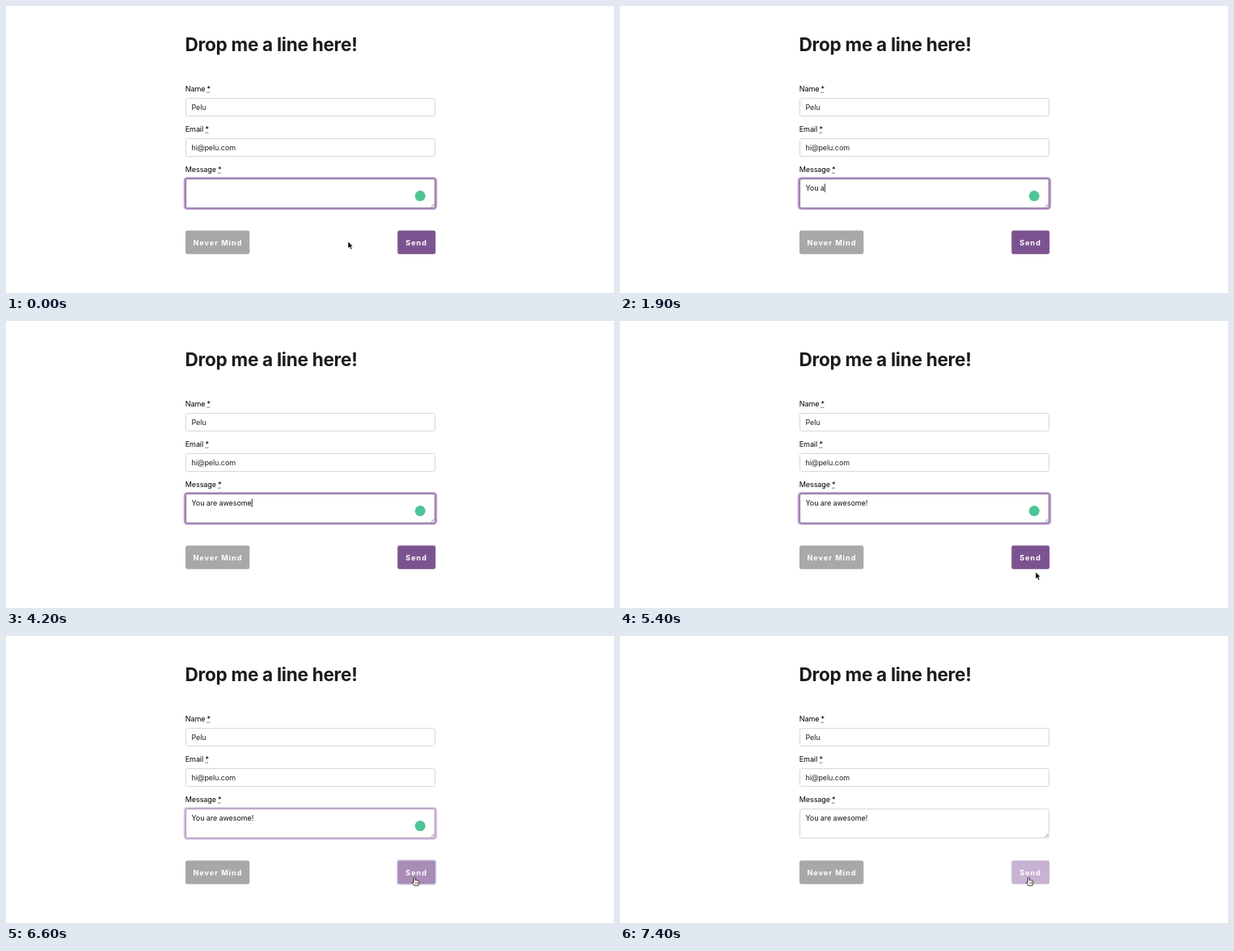
These frames come from a looping animation (752x356 px, 8000 ms). An HTML page:

```html
<!DOCTYPE html>
<html lang="en">
<head>
<meta charset="utf-8">
<title>Contact form</title>
<style>
  html, body { margin: 0; width: 100%; height: 100%; overflow: hidden; background: #fff; }
  svg { display: block; width: 752px; height: 356px; }
  text {
    font: 9px Inter, "Open Sans", sans-serif;
    font-optical-sizing: none;
    letter-spacing: -.09px;
    white-space: pre;
    fill: #222;
  }
  .title { font-size: 22.6px; font-weight: 700; letter-spacing: -.29px; fill: #1b1b1b; }
  .label { fill: #000; }
  .button { font-size: 9.1px; font-weight: 700; letter-spacing: 1px; fill: #fff; }
  .box { fill: #fff; stroke: #d8d8d8; }
  .dots { stroke: #333; stroke-dasharray: 1.2 1; }
</style>
</head>
<body>
<svg viewBox="0 0 752 356">
  <text class="title" x="221.6" y="56">Drop me a line here!</text>
  <g id="fields"></g>
  <g id="glow">
    <rect x="221" y="213.5" width="311" height="38" rx="3" fill="none" stroke="#b797c8" stroke-width="2.4"/>
    <rect x="222.5" y="214.5" width="308" height="36" rx="2" fill="none" stroke="#8c69a1"/>
  </g>
  <path d="M525.5 249.5l4-4M528 249.5l1.7-1.7" stroke="#777" stroke-width=".8"/>
  <text id="message" x="229.5" y="229.1" style="fill:#111"></text>
  <rect id="caret" y="220.5" width=".9" height="10.5" fill="#222"/>
  <circle id="badge" cx="512.3" cy="235.6" r="6.5" fill="#4dc596"/>

  <rect x="222" y="278.5" width="79.3" height="29.3" rx="2.4" fill="#a8a8a8"/>
  <text class="button" x="231.4" y="296.7">Never Mind</text>
  <rect id="ring" x="483.6" y="277.8" width="48.4" height="30.6" rx="3" fill="none" stroke="#b3bde4" stroke-width="1.7"/>
  <rect id="send" x="484.3" y="278.5" width="47" height="29.3" rx="2.4"/>
  <text class="button" x="494.2" y="296.7">Send</text>

  <g id="arrow" stroke="#fff" stroke-width=".6">
    <path d="M0 0V8.6L2 6.8L3.4 10L5 9.3L3.6 6.2H6.2Z" fill="#000"/>
  </g>
  <g id="hand" stroke="#111" stroke-width=".8" stroke-linejoin="round">
    <path d="M-1 .8Q0 -.5 1 .8V4Q2 3 2.8 4.2Q3.8 3.4 4.4 4.6Q5.6 4.2 5.6 5.6V7.4L4.6 10.6H-.2L-2.9 6.6Q-2.7 5.3 -1 6.4Z" fill="#fff"/>
    <path d="M1.3 6.2V8.6M2.8 6.2V8.6M4.1 6.2V8.6" stroke-width=".5"/>
  </g>
</svg>
<script>
const $ = id => document.getElementById(id);
const LOOP = 8000;
const MESSAGE = 'You are awesome!';
// [time, number of typed characters]; each one restarts the caret blink
const KEYS = [[400, 0], [600, 1], [900, 2], [1100, 3], [1700, 4], [1900, 5], [2500, 6],
  [2800, 8], [3100, 9], [3300, 10], [3600, 11], [3700, 12], [3800, 13], [4000, 14],
  [4200, 15], [4700, 16]];
const BASE = [124, 83, 145], HOVER = [169, 141, 183], DISABLED = [200, 178, 209];

const ramp = (t, from, to) => Math.min(1, Math.max(0, (t - from) / (to - from)));
const mix = (a, b, p) => a.map((v, i) => v + (b[i] - v) * p);
const show = (id, on) => $(id).style.opacity = +on;
const place = (id, x, y) => $(id).setAttribute('transform', `translate(${x} ${y})`);

function field(label, value, starX, y, height) {
  return `<text class="label" x="221.8" y="${y}">${label}<tspan x="${starX}">*</tspan></text>
    <path class="dots" d="M${starX} ${y + 1}h4"/>
    <rect class="box" x="222.5" y="${y + 8.3}" width="308" height="${height}" rx="2"/>
    <text x="229.5" y="${y + 22.9}">${value}</text>`;
}
$('fields').innerHTML =
  field('Name', 'Pelu', 248.4, 106.2, 22) +
  field('Email', 'hi@pelu.com', 246.6, 156.2, 22) +
  field('Message', '', 262.1, 206.2, 36);

function draw(t) {
  const [since, count] = KEYS.filter(k => k[0] <= t).pop() || [t - 500, 0];
  const text = $('message');
  text.textContent = MESSAGE.slice(0, count);
  $('caret').setAttribute('x', 229.6 + (count ? text.getComputedTextLength() : 0));
  show('caret', (t - since) % 1000 < 500 && t < 6600);

  const blur = ramp(t, 6550, 6680);
  const sent = ramp(t, 6900, 7150);
  $('glow').style.opacity = 1 - blur;
  $('ring').style.opacity = blur * (1 - sent);
  show('badge', t < 7000);
  const hover = mix(BASE, HOVER, ramp(t, 5500, 5700));
  $('send').style.fill = `rgb(${mix(hover, DISABLED, sent)})`;

  const move = 1 - (1 - ramp(t, 5250, 5700)) ** 2;
  const [x, y] = t < 600 ? [423, 292] : mix([525, 327], [505.4, 299.1], move);
  const over = t > 600 && y < 307;
  place('arrow', x, y);
  place('hand', x, y);
  show('arrow', !over && (t < 600 || t >= 5250));
  show('hand', over);
}

const start = performance.now();
function frame() {
  draw((performance.now() - start) % LOOP);
  requestAnimationFrame(frame);
}
frame();
</script>
</body>
</html>
```
